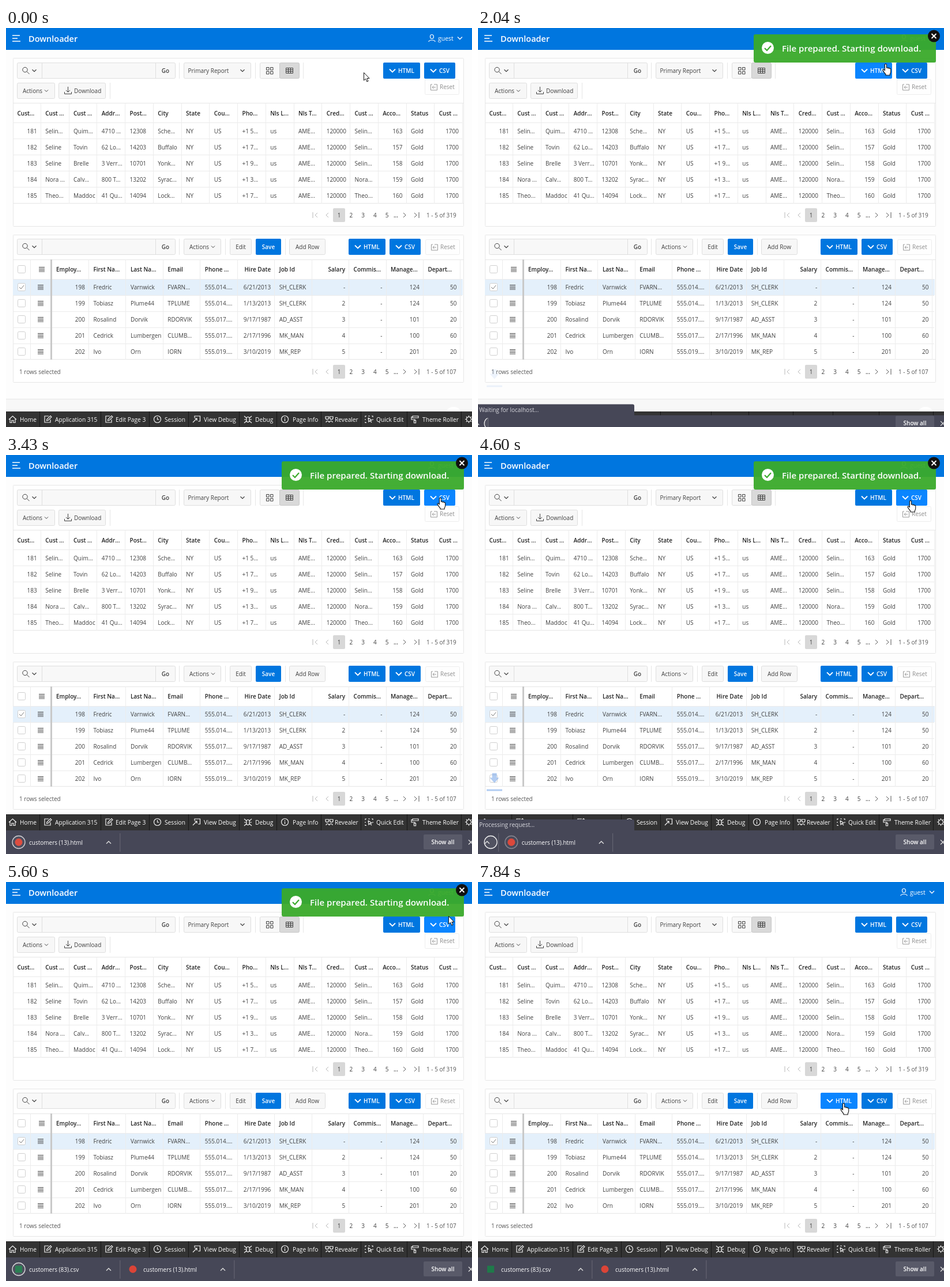
An HTML page that plays this animation: 808x693 px, repeating every 7990 ms.

```html
<!DOCTYPE html>
<html lang="en">
<head>
<meta charset="utf-8">
<title>Downloader</title>
<style>
html, body { margin: 0; width: 100%; height: 100%; overflow: hidden; background: #fdfdfd; }
svg { display: block; width: 808px; height: 693px; font: 10px "Open Sans", "Noto Sans", sans-serif; }
text { white-space: pre; }
</style>
</head>
<body>
<svg id="stage" viewBox="0 0 808 693"></svg>
<script>
const LOOP = 7990;
const BLUE = '#0076df', HOVER = '#0a85ff', PRESSED = '#0067c4';
const INK = '#404040', LINE = '#e6e6e6';

// Drawing helpers
const rect = (x, y, w, h, fill, stroke, r = 0, more = '') => stroke
  ? `<rect x="${x + .5}" y="${y + .5}" width="${w - 1}" height="${h - 1}" rx="${r}" fill="${fill}" stroke="${stroke}" ${more}/>`
  : `<rect x="${x}" y="${y}" width="${w}" height="${h}" rx="${r}" fill="${fill}" ${more}/>`;
const text = (x, cy, s, { fill = INK, bold, end, mid, size = 10 } = {}) =>
  `<text x="${x}" y="${cy + size * .36}" fill="${fill}" font-size="${size}"` +
  `${bold ? ' font-weight="600"' : ''}${end ? ' text-anchor="end"' : mid ? ' text-anchor="middle"' : ''}>${s}</text>`;
const path = (x, y, d, stroke = INK, w = 1, fill = 'none') =>
  `<path transform="translate(${x} ${y})" d="${d}" stroke="${stroke}" stroke-width="${w}" fill="${fill}"/>`;
const group = (id, body, more = '') => `<g id="${id}" ${more}>${body}</g>`;
const vline = (x, y1, y2, c = LINE) => rect(x, y1, 1, y2 - y1, c);
const hline = (x1, x2, y, c = LINE) => rect(x1, y, x2 - x1, 1, c);
const down = (x, y, c, w = 1.2, s = 3.5) => path(x, y, `M${-s} ${-s / 2}L0 ${s / 2}L${s} ${-s / 2}`, c, w);

const button = (x, y, w, label, o = {}) =>
  rect(x, y, w, 28, '#f7f7f7', '#dedede', 2) + text(x + w / 2, y + 14.5, label, { mid: true, ...o });
const blueButton = (id, x, y, w, label) =>
  rect(x, y, w, 28, BLUE, '', 2, `id="${id}"`) +
  down(x + 16, y + 14, '#fff', 1.8, 5) + text(x + 26, y + 14.5, label, { fill: '#fff', bold: true });
const reset = (x, y) =>
  rect(x, y, 60, 27, '#fefefe', '#ededed', 2) +
  path(x + 10, y + 8, 'M3 1H.5V11H11.500V1H6M3 6H9M5.500 3.500L3 6L5.500 8.500', '#9a9a9a') +
  text(x + 26, y + 13.500, 'Reset', { fill: '#8e8e8e' });

const search = y =>
  rect(19, y, 275, 28, '#f8f8f8', '#dedede', 2) + vline(62, y, y + 28, '#dedede') + vline(259, y, y + 28, '#dedede') +
  `<circle cx="33" cy="${y + 12.500}" r="4.200" fill="none" stroke="${INK}"/>` +
  path(36, y + 15.500, 'M0 0L4.500 4.500') + down(49, y + 14) +
  text(276.5, y + 14.500, 'Go', { mid: true, bold: true });

function pager(y, total) {
  const dim = '#b8b8b8', on = '#555';
  return path(536, y, 'M-4-5V5M4-4L0 0L4 4', dim) + path(557, y, 'M2-4L-2 0L2 4', dim) +
    rect(567, y - 12, 21, 24, '#d8d8d8', '', 2) +
    [1, 2, 3, 4, 5].map((n, i) => text(577.500 + 20.800 * i, y, n, { mid: true })).join('') +
    text(676, y, '...', { mid: true, bold: true }) +
    path(691, y, 'M-2-4L2 0L-2 4', on) + path(712, y, 'M-4-4L0 0L-4 4M4-5V5', on) +
    text(729, y, '1 - 5 of ' + total, { fill: '#555' });
}

// One table: heads and rows are lists; the set "right" holds right-aligned columns
function table({ x, y, w, headH, heads, rows, right, rightHeads = [] }) {
  const cell = (i, cy, s, isRight, bold) =>
    text(isRight ? x + w * (i + 1) - 7 : x + w * i + 7.500, cy, s, { end: isRight, bold, fill: bold ? '#222' : INK });
  let out = '';
  heads.forEach((h, i) => {
    out += vline(Math.round(x + w * (i + 1)) - 1, y, y + headH + 140, '#ececec') +
      cell(i, y + headH / 2 + .5, h, rightHeads.includes(i), true);
  });
  rows.forEach((row, r) => row.forEach((s, i) => {
    out += cell(i, y + headH + 14.500 + 27.900 * r, s, right.includes(i));
  }));
  return out;
}

function topRegion() {
  const people = ['Selin...|Quim...|4710 ...|12308|Sche...|5|163', 'Seline|Tovin|62 Lo...|14203|Buffalo|7|157',
    'Seline|Brelle|3 Verr...|10701|Yonk...|9|158', 'Nora ...|Calv...|800 T...|13202|Syrac...|3|159',
    'Theo...|Maddoc|41 Qu...|14094|Lock...|7|160'];
  const mail = ['Selin...', 'Selin...', 'Selin...', 'Nora...', 'Theo...'];
  const rows = people.map((p, i) => {
    const [first, last, street, zip, city, ph, acc] = p.split('|');
    return [181 + i, first, last, street, zip, city, 'NY', 'US', `+1 ${ph}...`, 'us', 'AME...', '120000', mail[i], acc, 'Gold', '1700'];
  });
  const heads = 'Cust...|Cust ...|Cust ...|Addr...|Post...|City|State|Cou...|Pho...|Nls L...|Nls T...|Cred...|Cust ...|Acco...|Status|Cust ...'.split('|');
  let grid = '';
  for (const gx of [0, 7]) for (const gy of [0, 7]) grid += `M${gx} ${gy}h4.500v4.500h-4.500z`;
  return rect(12, 52, 782, 293, '#fff', LINE, 1) + search(60) +
    vline(300, 60, 88) + rect(308, 60, 117, 28, '#f7f7f7', '#dedede', 2) + text(315.500, 74.500, 'Primary Report') + down(410, 74) +
    vline(432, 60, 88) + rect(440, 60, 35, 28, '#f8f8f8', '#dedede', 2) + path(451.500, 68.500, grid) +
    rect(474, 60, 35, 28, '#d9d9d9', '#c8c8c8', 2) + path(485, 69, 'M.5 .5H12.500V9.500H.5ZM0 3.500H13M0 6.500H13M4.500 1V9M8.500 1V9') +
    vline(515, 60, 88) +
    button(19, 95, 66, '') + text(29, 109.500, 'Actions') + down(70, 109, INK, 1, 3) +
    button(91, 95, 82, '') + path(101, 102, 'M6.500 0V9M3 6L6.500 9.500L10 6M.5 9V12.500H12.500V9') + text(118, 109.500, 'Download') +
    vline(180, 95, 123) +
    reset(726, 89) + blueButton('html1', 654, 60, 64, 'HTML') + blueButton('csv1', 725, 60, 54, 'CSV') +
    hline(12, 793, 130) + [165, 193, 221, 249, 277].map(y => hline(12, 791, y - 1, '#ebebeb')).join('') +
    hline(12, 793, 304) +
    table({ x: 12, y: 130, w: 48.750, headH: 35, heads, rows, right: [0, 11, 13, 15] }) + pager(325, 319);
}

function bottomRegion() {
  const heads = 'Employ...|First Na...|Last Na...|Email|Phone ...|Hire Date|Job Id|Salary|Commis...|Manage...|Depart...'.split('|');
  const rows = ['198|Fredric|Varnwick|FVARN...|555.014....|6/21/2013|SH_CLERK|-|-|124|50',
    '199|Tobiasz|Plume44|TPLUME|555.014....|1/13/2013|SH_CLERK|2|-|124|50',
    '200|Rosalind|Dorvik|RDORVIK|555.017....|9/17/1987|AD_ASST|3|-|101|20',
    '201|Cedrick|Lumbergen|CLUMB...|555.017....|2/17/1996|MK_MAN|4|-|100|60',
    '202|Ivo|Orn|IORN|555.019....|3/10/2019|MK_REP|5|-|201|20'].map(s => s.split('|'));
  let marks = '';
  for (let i = 0; i < 6; i++) {
    const cy = i ? 422.500 + 27.900 * i : 419;
    marks += rect(20, Math.round(cy) - 7, 14, 14, '#fff', '#cfcfcf', 2) +
      path(i ? 55 : 57, Math.round(cy) - 4, 'M0 .5H10M0 3H10M0 5.500H10M0 8H10', '#444');
  }
  return rect(12, 359, 782, 257, '#fff', LINE, 1) + search(366) +
    vline(300, 366, 394) + button(308, 366, 65, '') + text(318, 380.500, 'Actions') + down(359, 380, INK, 1, 3) +
    vline(380, 366, 394) + button(388, 366, 38, 'Edit') +
    rect(433, 366, 44, 28, BLUE, '', 2) + text(455, 380.500, 'Save', { fill: '#fff', bold: true, mid: true }) +
    vline(484, 366, 394) + button(491, 366, 63, 'Add Row') +
    blueButton('html2', 594, 366, 64, 'HTML') + blueButton('csv2', 665, 366, 54, 'CSV') + reset(727, 367) +
    hline(12, 793, 402) + rect(12, 436, 780, 28, '#e4f0fb') +
    [436, 464, 492, 520, 548].map(y => hline(12, 791, y, '#ebebeb')).join('') + hline(12, 793, 575) +
    vline(42, 402, 576, '#ececec') + rect(77, 402, 3, 174, '#c9c9c9') + marks + path(23, 447, 'M0 3L3 6L8 0', '#777') +
    table({ x: 79.500, y: 402, w: 64.450, headH: 34, heads, rows, right: [0, 5, 7, 8, 9, 10], rightHeads: [5, 7] }) +
    text(23, 597, '1 rows selected', { fill: '#555' }) + pager(597, 107);
}

function devBar() {
  const edit = 'M8 1H1V12H11V7M4.500 9L5 6.500L11 .5L13 2.500L7 8.500Z';
  const cog = 'M6.500 0V2M6.500 11V13M0 6.500H2M11 6.500H13M2 2L3.300 3.300M9.700 9.700L11 11M2 11L3.300 9.700M9.700 3.300L11 2M2.500 6.500a4 4 0 1 0 8 0a4 4 0 1 0-8 0';
  const ring = 'M.5 6.500a6 6 0 1 0 12 0a6 6 0 1 0-12 0';
  const items = [
    [5, 24, 'Home', 'M0 7L6.500 1L13 7M2 6V12.500H5V8.500H8V12.500H11V6'],
    [66, 85, 'Application 315', edit], [172, 190, 'Edit Page 3', edit],
    [256, 275, 'Session', ring + 'M6.500 3V7H9.500'],
    [324, 343, 'View Debug', 'M3 4V1H12.500V10H9M0 12L7 5M3 5H7V9'],
    [413, 432, 'Debug', 'M4 5a2.500 2.500 0 0 1 5 0V9a2.500 2.500 0 0 1-5 0ZM0 1L4 4.500M13 1L9 4.500M0 7H4M9 7H13M0 13L4 9.500M13 13L9 9.500'],
    [477, 497, 'Page Info', ring + 'M6.500 5.500V10M6.500 3V4.500'],
    [554, 570, 'Revealer', 'M0 2H5.500V4a2.700 2.700 0 0 1-5.500 0ZM7.500 2H13V4a2.700 2.700 0 0 1-5.500 0ZM1 12a2.500 2.500 0 0 1 5 0M7 12a2.500 2.500 0 0 1 5 0'],
    [623, 642, 'Quick Edit', 'M0 3V1H2M5 1H8M11 1H13V3M0 6V8M0 11V12.500H2M13 6V8M5 4L6 11L8 9L11 12M5 4L11 8L8 9'],
    [703, 722, 'Theme Roller', 'M2 1H12V4H2ZM2 2.500H0V7H6V8.500M4.500 8.500H7.500V13H4.500Z'],
    [796, 0, '', cog]];
  return rect(0, 0, 808, 28, '#333') +
    [59, 165, 249, 317, 405, 470, 547, 616, 696, 790].map(x => vline(x - 1, 0, 28, '#181818')).join('') +
    items.map(([ix, tx, s, d]) => path(ix, 7, d, '#f2f2f2', 1.200) + text(tx, 14.500, s, { fill: '#fff', size: 10.200 })).join('');
}

// A download on the shelf; its place and width are set in draw()
const item = (n, name, icon) =>
  `<clipPath id="clip${n}"><rect id="box${n}" y="652" height="41" width="0"/></clipPath>` +
  `<clipPath id="cut${n}"><rect id="trim${n}" y="650" height="43" width="0"/></clipPath>` +
  group('item' + n, group('in' + n, group('icon' + n, icon) +
    `<circle id="ring${n}" cx="22" cy="672.500" r="11" fill="#fff" fill-opacity=".06" stroke="#f0f0f0" stroke-width="1.300"/>` +
    `<g clip-path="url(#cut${n})">${text(40, 673.500, name, { fill: '#fff' })}</g>` +
    group('caret' + n, path(0, 673, 'M-4 2L0-2L4 2', '#ddd', 1.400)) +
    rect(0, 657, 1, 32, '#74747f', '', 0, `id="sep${n}"`), `clip-path="url(#clip${n})"`));

const shelf = rect(0, 652, 808, 60, '#464757') + group('shelfIn',
  item(1, 'customers (13).html', '<circle cx="22" cy="672.500" r="6.500" fill="#db4437"/>') +
  item(2, 'customers (83).csv', rect(16, 666.500, 12, 12, '#1f7a4a')) +
  rect(724, 659, 67, 26, '#595a69', '', 2) + text(757.500, 672.500, 'Show all', { fill: '#fff', bold: true, mid: true }) +
  path(802, 668.500, 'M0 0L8 8M8 0L0 8', '#ddd', 1.300));

const notice = rect(478, 11, 316, 49, '#3aaa2b', '', 3, 'fill-opacity=".95"') +
  '<circle cx="502.500" cy="34.500" r="10.500" fill="#fff"/>' + path(497, 30, 'M0 5L4 9L11 1', '#3aaa2b', 2.200) +
  text(527, 35.500, 'File prepared. Starting download.', { fill: '#fff', bold: true, size: 15.100 }) +
  '<circle cx="790.500" cy="14" r="10.500" fill="#111"/>' + path(786.500, 10, 'M0 0L8 8M8 0L0 8', '#fff', 1.800);

const stage = document.getElementById('stage');
stage.innerHTML = rect(0, 0, 808, 693, '#fdfdfd') + rect(0, 0, 808, 38, BLUE) +
  path(11, 13, 'M0 0H13M0 5H9M0 10H14', '#fff', 1.700) + text(39, 18.500, 'Downloader', { fill: '#fff', bold: true, size: 14.500 }) +
  path(732, 11, 'M3.500 4a3 3.500 0 1 0 6 0a3 3.500 0 1 0-6 0M1 13C1 9 12 9 12 13', '#fff', 1.200) +
  text(749, 18, 'guest', { fill: '#fff', size: 10.500 }) + down(787, 17.500, '#fff', 1.300, 4) +
  topRegion() + bottomRegion() +
  rect(0, 644, 808, 49, '#f7f7f7') + hline(0, 808, 644) + '<circle cx="776" cy="673" r="15" fill="#fff"/>' +
  group('dev', devBar()) + group('shelf', shelf) +
  group('status', rect(-4, 0, 275, 24, '#464757', '', 3) + '<text id="say" x="2" y="13" fill="#d8d8de"></text>') +
  group('drop', '<path d="M-4 0H4V8H8L0 17L-8 8H-4Z" fill="#7ba9ea"/>' + rect(-13.500, 28, 27, 3, '#7ba9ea')) +
  group('notice', notice) +
  group('arrow', path(0, 0, 'M.5 .5V14L3.600 11.200L5.800 16.200L8 15.200L5.900 10.400H10Z', '#111', 1, '#fff')) +
  group('hand', path(0, 0, 'M-1.600 11.500V1.800a1.500 1.500 0 0 1 3 0V7.500c.4-1.100 2.600-1 2.800.4c.6-.9 2.400-.6 2.600.7c.8-.6 1.900 0 1.900 1.200V14c0 2-1 3-1.500 4.500V20H0V18.500C-1.500 17-3.500 14-4.800 11.900c-.8-1.600 1-2.600 2-1.400Z', '#111', 1.100, '#fff'));

const BURSTS = [[340, 490, 3], [650, 650, 1], [800, 1110, 5], [1740, 1810, 2], [2040, 2820, 11], [2900, 3670, 11],
  [3740, 4280, 8], [4430, 5210, 11], [5290, 6070, 11], [6150, 6920, 11], [6990, 7220, 4], [7610, 7840, 4]];
function snap(t) {
  let at = 0;
  for (const [a, b, n] of BURSTS) {
    if (t < a) break;
    const step = (b - a) / (n - 1) || 1;
    at = a + Math.min(n - 1, Math.floor((t - a) / step + .15)) * step;
  }
  return at;
}

const POINTER = [[0, 620, 77], [260, 620, 77], [490, 710, 68], [760, 710, 68], [880, 707, 52], [1110, 707, 62], [2040, 707, 62],
  [2820, 710, 72], [3350, 753, 74], [3740, 753, 74], [4280, 750, 79], [5250, 750, 79], [5600, 767, 59], [6070, 778, 20],
  [6230, 787, 12], [6340, 785, 14], [6690, 686, 281], [6920, 642, 363], [7220, 634, 384], [LOOP, 634, 384]];
const clamp = v => Math.max(0, Math.min(1, v));
const easeOut = p => 1 - (1 - clamp(p)) ** 2;
const within = (t, a, b) => t >= a && t < b;

function pointerAt(t) {
  const i = POINTER.findIndex(k => k[0] > t);
  const [t0, x0, y0] = POINTER[i - 1], [t1, x1, y1] = POINTER[i];
  let p = (t - t0) / (t1 - t0);
  p = p * p * (3 - 2 * p);
  return [x0 + (x1 - x0) * p, y0 + (y1 - y0) * p];
}

const $ = id => document.getElementById(id);
const set = (id, name, v) => $(id).setAttribute(name, v);
const move = (id, x, y) => set(id, 'transform', `translate(${x} ${y})`);
const show = (id, on) => set(id, 'visibility', on ? 'visible' : 'hidden');
const tint = (id, hover, press) => set(id, 'fill', press ? PRESSED : hover ? HOVER : BLUE);

function placeItem(n, t, x, w, done) {
  move('item' + n, x, 0);
  set('box' + n, 'width', w + .5);
  set('trim' + n, 'width', Math.max(0, w - 28));
  move('caret' + n, w - 20, 0);
  set('sep' + n, 'x', w - .5);
  show('icon' + n, t >= done);
  const p = (t - done) / 1000;
  set('ring' + n, 'opacity', p < 0 ? 1 : p >= 2.500 ? 0 : .5 + .5 * Math.cos(2 * Math.PI * p));
}

function draw(time) {
  const t = snap(time);

  tint('html1', within(t, 400, 2950), within(t, 850, 1050));
  tint('csv1', within(t, 3100, 5700), within(t, 3800, 3960));
  tint('html2', t >= 6980, within(t, 7610, 7800));

  // Download shelf
  const open = easeOut((t - 2005) / 120);
  const top = 693 - 41 * open;
  show('shelf', t >= 2005);
  move('shelf', 0, top - 652);
  move('shelfIn', 0, -.300 * (top - 652));
  move('dev', 0, t >= 2120 ? 624 : 666);
  const w1 = 198 * easeOut((t - 2003) / 800), w2 = 198 * easeOut((t - 4510) / 800);
  placeItem(1, t, w2, w1, 2300);
  placeItem(2, t, 0, w2, 4720);
  show('item2', w2 > 0);

  // Browser status line
  show('status', within(t, 1740, 2480) || within(t, 3880, 4880));
  move('status', 0, top - 19);
  $('say').textContent = t < 3000 ? 'Waiting for localhost...' : 'Processing request...';

  // Falling arrow
  const first = t < 3000, p = (t - (first ? 2015 : 4440)) / 600;
  move('drop', 28.500, (first ? 590 : 537) + 64 * clamp(p));
  set('drop', 'opacity', p > 0 && p < 1 ? .8 * (1 - 4 * (p - .5) ** 2) : 0);

  set('notice', 'opacity', Math.min(clamp((t - 1670) / 140), clamp((6450 - t) / 200)));

  const [x, y] = pointerAt(t);
  const isHand = within(t, 400, 5280) || t >= 6980;
  show('hand', isHand);
  show('arrow', !isHand);
  move('hand', x, y);
  move('arrow', x, y);
}

const began = performance.now();
function tick() {
  draw((performance.now() - began) % LOOP);
  requestAnimationFrame(tick);
}
tick();
</script>
</body>
</html>
```
